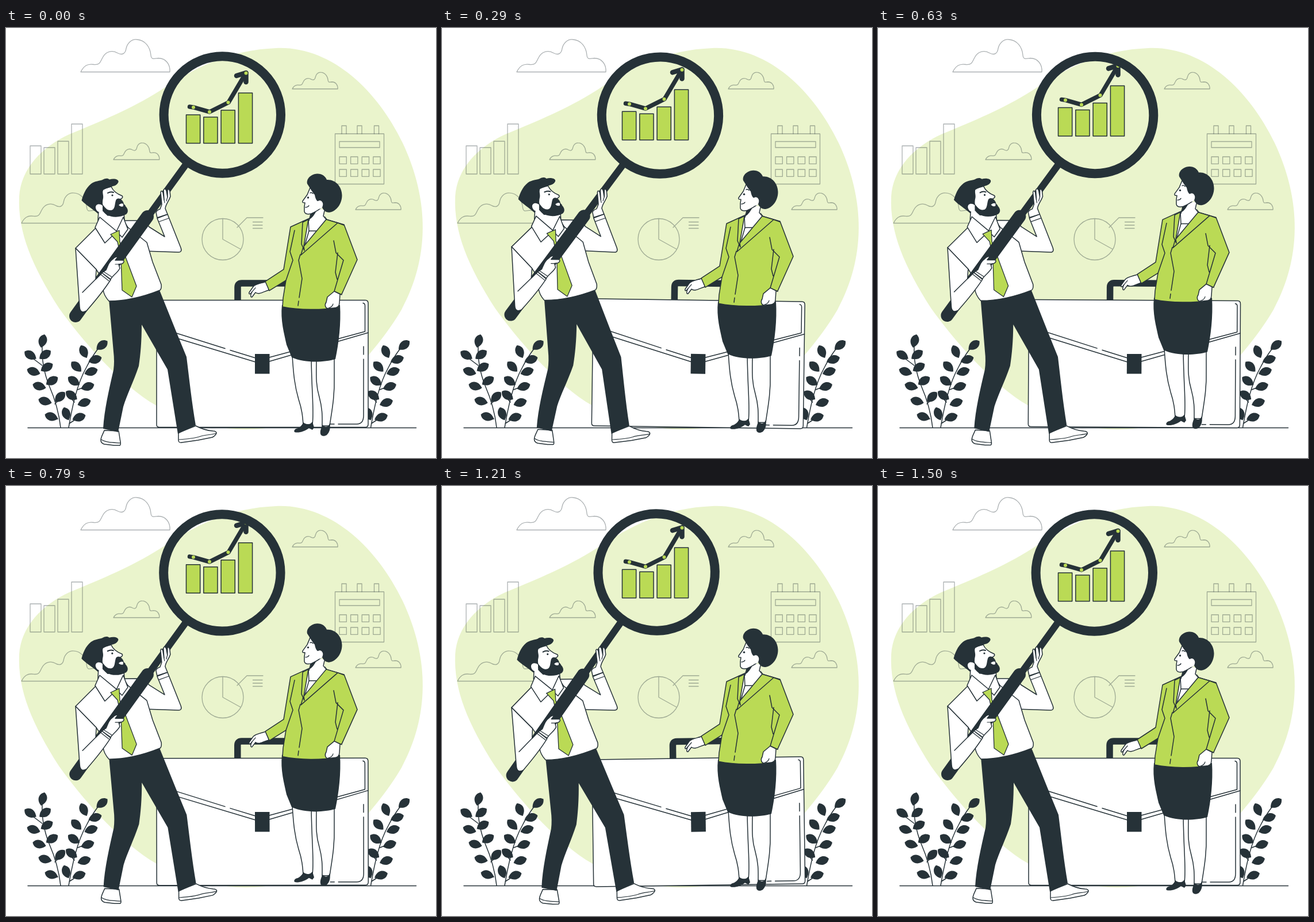
These frames come from a looping animation (748 by 748 pixels, 1.54 s). An HTML page with a canvas:

```html
<!DOCTYPE html>
<html lang="en">
<head>
<meta charset="utf-8">
<title>Business growth</title>
<style>
html, body { margin: 0; width: 100%; height: 100%; overflow: hidden; background: #fff; }
canvas { display: block; width: 748px; height: 748px; }
</style>
</head>
<body>
<canvas id="stage" width="748" height="748"></canvas>
<script>
const ctx = document.getElementById('stage').getContext('2d');
const DARK = '#263238', GREEN = '#bada55', PALE = '#eaf4cc', WHITE = '#fff';
const FAINT = 'rgba(38,50,56,.38)';
const LOOP = 1540, CYCLE = 1500, LIFT = 14.96;

ctx.lineJoin = ctx.lineCap = 'round';

function shape(d, fill, stroke = DARK, width = 1.5) {
  const path = new Path2D(d);
  if (fill) { ctx.fillStyle = fill; ctx.fill(path); }
  if (stroke) { ctx.strokeStyle = stroke; ctx.lineWidth = width; ctx.stroke(path); }
}
const solid = (d, color = DARK) => shape(d, color, null);
const line = (d, width = 1.5, color = DARK) => shape(d, null, color, width);
const box = (x, y, w, h) => `M${x} ${y}h${w}v${h}h${-w}z`;

function disc(x, y, r, color) {
  ctx.fillStyle = color;
  ctx.beginPath();
  ctx.arc(x, y, r, 0, Math.PI * 2);
  ctx.fill();
}

function placed(draw, dx, dy) {
  ctx.save();
  ctx.translate(dx, dy);
  draw();
  ctx.restore();
}

function turned(draw, cx, cy, degrees) {
  ctx.save();
  ctx.translate(cx, cy);
  ctx.rotate(degrees * Math.PI / 180);
  ctx.translate(-cx, -cy);
  draw();
  ctx.restore();
}

function cloud(x, y, scale) {
  ctx.save();
  ctx.translate(x, y);
  ctx.scale(scale, scale);
  line('M0 0C5-10 11-15 23-13C34-12 34-18 38-25C44-37 56-38 64-33C73-28 78-33 79-41' +
       'C81-50 88-57 97-56.5C112-56 121-43 122-29C123-21 127-23 135-24C149-24 156-12 155 0Z', 1.3 / scale, FAINT);
  ctx.restore();
}

function background() {
  solid('M470 35C565 31 645 107 690 200C737 300 737 400 688 490C655 546 610 594 560 645' +
        'C500 698 440 700 400 698C340 692 290 675 250 650C190 610 130 540 92 487' +
        'C46 415 20 355 23 293C26 245 62 207 110 185C170 160 215 142 268 109C330 68 390 38 470 35Z', PALE);

  cloud(130, 76.5, 1);
  cloud(498, 106, .51);
  cloud(187, 229, .515);
  cloud(608, 316, .51);
  cloud(27, 339.5, .93);

  [205, 208, 197, 167].forEach((top, i) => line(box(42 + 24 * i, top, 19, 254 - top), 1.3, FAINT));

  line(box(572.5, 184, 85, 87.5) + box(580, 197.5, 70, 10.5), 1.3, FAINT);
  for (const x of [584, 611, 640.5]) line(`M${x} 184v-14h8v14`, 1.3, FAINT);
  for (let i = 0; i < 8; i++) {
    line(box(580 + 19.6 * (i % 4), i < 4 ? 224 : 246, 12.3, 12.3), 1.3, FAINT);
  }

  line('M341 367.5a36 36 0 1 0 72 0a36 36 0 1 0-72 0M377 332v35.5l31.5 17.5M402 347l17-17h28' +
       'M429.5 337.5h16.5M429.5 343h16.5M429.5 348.5h16.5', 1.3, FAINT);
  line('M38 695.5H713.5');
}

// Each leaf is [x, y, angle], measured at its middle.
const tallPlant = [
  [64, 544.5, -75], [42.5, 569, 212], [68, 568.5, -35], [48, 597.5, 198], [71, 590.5, -30], [58, 623, 195],
  [80, 614, -32], [68, 649, 195], [94, 642, -45], [79, 676, 198]
];
const leaningPlant = [
  [167, 552, -38], [135.5, 563, 245], [155, 577, -18], [122.5, 589, 225], [148, 598, -18], [118, 614, 214],
  [142, 624, -18], [114, 639, 216], [136, 652, -18], [105, 671, 250], [127, 677.5, -18]
];

function plant(stem, leaves) {
  line(stem, 1.5);
  for (const [x, y, angle] of leaves) {
    placed(() => {
      ctx.rotate(angle * Math.PI / 180);
      solid('M-12 0C-8-5-4-7.500 1-7.500C7-7 10-4 12 0C9 5 5 7.500 0 7C-5 6.500-8 4-12 0Z');
    }, x, y);
  }
}
const leaning = () =>
  plant('M109 695C115 660 123 620 140 590C147 576 154 566 160 558M119 651l-5-6M125 629l13-5M110 688l14-9', leaningPlant);

function plants() {
  plant('M95 695C92 668 85 645 75 622C65 597 62 575 63 552M90 680l-10-3M85 654l8-8M63 587l-16-12', tallPlant);
  leaning();
  placed(leaning, 525.5, 0);
}

function briefcase() {
  line('M403 476V451Q403 444 410 444H485Q493 444 493 452V476', 11.5);
  shape('M267 473.5H625Q630 473.5 630 479V689Q630 694.5 625 694.5H267Q262 694.5 262 690V478.5Q262 473.5 267 473.5Z', WHITE);
  line('M262 520L381 557.5M390 560.5L434 574M262 529L434 581M458 573L624.5 528V483Q624.5 479 621 478.5' +
       'M458 580L630 530M622 554v14M622 576v98Q622 689 610 689H578M564 689h7');
  solid(box(433, 567, 25.5, 34.5));
}

function womanLegs() {
  shape('M498 570C500 602 502 622 509 646C515 664 516 676 517 690H533C536 665 532 640 531 575Z', WHITE);
  shape('M540 575C540 600 538 619 545 642C551 664 550 678 550 692H563C567 665 572 640 571 608V572Z', WHITE);
  solid('M517 686C524 691 529 690 533 685L536 695L533 699L527 696C519 702 509 705 502 703C500 700 503 697 508 696Q515 692 517 686Z');
  solid('M550 690C556 696 561 694 563 688C565 696 563 703 558 708C553 711 548 710 547 706C546 699 549 696 550 690Z');
  solid('M480 482C477 508 484 532 488 551L497 573C520 583 552 582 573 576C579 548 583 514 581 482Z');
}

function womanJacket() {
  shape('M455 440C446 444 434 445 430 450L423 460C422 464 425 464 428 459C425 464 425 469 428 468L434 460C440 465 449 458 457 456Z', WHITE);
  line('M428 459L434 452', 1.2);

  shape('M517 336L495 346L483 420L451 441L458 457L487 439L482 470L481 485C510 491 549 491 579 486L578 464' +
        'L584 463L611 403L588 342L557 333L519 387Z', GREEN);
  line('M502 352L494 389L499 404L487 439M570 370L574 391L587 404L571 458L584 464M577 391L573 425L576 437');
  shape('M571 458L581 463L580 478C580 486 574 487 570 487L561 488C555 488 554 481 557 477L559 468Z', WHITE);
  line('M561 487C566 486 568 484 569 480', 1.2);

  shape('M517 336L528 331L554 328L558 333L519 386Z', WHITE);
  line('M526 333L527 354M527 353H542M527 353L519 381');
  shape('M557 333L577 339L588 343M577 339L513 395L517 381L557 333Z', GREEN);
  shape('M526 333L516 338L514 376L519 387L518 380Z', GREEN);
  line('M512 394L509 404L515 436L510 469M509 475L508 483');
}

function womanHead() {
  shape('M533 314L528 335Q528 344 533 345L557 332Q552 329 554 316Z', WHITE, null);
  line('M530 324L527 335M554 318L552 327L557 333');
  solid('M526 322Q535 322 541 316Q535 329 528 333L530 325Z');
  shape('M529 278L524 290L516 301C515 304 517 304 520 304L519 311L519 319C520 325 527 324 531 323' +
        'C540 319 546 315 549 312L552 288L536 278Z', WHITE);
  solid('M524 271C522 262 531 254 541 253.5C549 253 556 258 558 264C573 263 584.5 276 584.5 291' +
        'C584.5 306 575 318 564 320.5C557 322 552 317 550 312L545 301C541 304 538 296 537 290C533 286 530 280 524 271Z');
  shape('M541 303C546 296 553 303 551 309C550 315 545 316 541 313Z', WHITE, null);
  line('M521 312Q525 312 527 309M529 287Q531 285 534 288', 1.4);
  disc(525.5, 295, 1.7, DARK);
}

function woman() {
  womanLegs();
  womanJacket();
  womanHead();
}

function chart() {
  [151, 155, 143, 113].forEach((top, i) => shape(box(313.5 + 30.3 * i, top, 24.2, 200.5 - top), GREEN));
  line('M319.5 137L326 138L354 146L387 129.5L417.5 78', 7.5);
  line('M401 83L417.5 78V94', 8.5);
  for (const [x, y] of [[326, 138], [354, 146], [386.5, 129.5], [417.5, 78.5]]) disc(x, y, 3, GREEN);
}

function manLegs() {
  shape('M171 700C169 706 165 711 165 717Q165 722 171 724L188 726H198Q200 725 199 720L196 701Z', WHITE);
  line('M166 716C173 721 186 721 199 722', 1.2);
  shape('M300 704L300 717Q300 722 306 721L334 717L359 712Q366 708 366 704Q365 701 360 701Q345 700 330 692Z', WHITE);
  line('M301 716C315 715 327 714 336 711C347 707 357 708 366 705', 1.2);
  solid('M179 472L267 456L296 528L314 572C319 612 323 650 330 691L299 706L281 594L236 516' +
        'C236 545 234 568 231 588C222 615 210 639 204 659L195 703L169 697C171 664 179 630 187 595Q189 580 187 563Z');
}

function manHead() {
  shape('M161 317L160 334L165 352L184 360L207 346L205 320Z', WHITE);
  shape('M168 280L183 276C187 285 194 289 202 292Q205 296 196 299L207 309L207 322L177 326L163 312Z', WHITE);
  solid('M131.500 300C134 291 138 279 148 271C155 266 163 266 168 264C173 261 177 261 180 263.500' +
        'C187 261 197 263 195.500 268C193 275 185 275 180 277Q172 280 169 282C167 286 170 291 169 296' +
        'Q167 304 169 310L160 323C151 315 139 308 131.500 300Z');
  solid('M168 307C172 312 176 318 183 317C190 316 189 306 191 300C193 295 199 296 202 300' +
        'C206 304 204 308 208 310C214 316 212 322 209 324C199 330 184 330 176 325C169 321 166 315 168 307Z');
  solid('M196 308Q200 304 204 306L204 310Q200 312 196 308Z', WHITE);
  shape('M168 309C162 304 155 307 156 313C157 319 163 322 168 321Z', WHITE, null);
  line('M177 287Q182 284 187 286', 2);
  disc(185, 291, 1.6, DARK);
}

function magnifier() {
  line('M314 236L245 331', 12);
  line('M246 328L121 501', 22);
  ctx.lineWidth = 16;
  ctx.strokeStyle = DARK;
  ctx.beginPath();
  ctx.arc(376.3, 151, 101.7, 0, Math.PI * 2);
  ctx.stroke();
}

function man() {
  manLegs();

  shape('M204 335H240L249 346L276 363L263 331L281 324L304 382Q307 390 300 390L240 388Z', WHITE);
  shape('M158 346L121 383L157 420L171 441L169 455Q170 465 179 475C208 475 238 468 268 456Q271 453 270 446L255 407L245 373L211 346L204 333Z', WHITE);
  manHead();
  shape('M163 329L155 347L172 374L193 354Z', WHITE);
  shape('M204 329L212 350L202 364L192 354Z', WHITE);
  shape('M182 359L197 352L198 372L227 449L219 468L202 456L200 400L194 372Z', GREEN, DARK, 1.3);

  magnifier();

  // Near arm: sleeve below the grip, then the hand around it.
  shape('M121 383L128 485Q129 498 140 492C154 476 168 460 182 438L167 426L156 437L157 420Z', WHITE);
  line('M133 460L167 426');
  solid('M157 437L175 411L186 402L178 413L174 421L167 426Z');
  shape('M167 426L174 421C178 412 179 407 186 402C189 398 194 397 194 399L190 404L204 404Q207 407 202 410L196 411L198 418C194 426 187 429 182 437Z', WHITE);
  line('M165 429L179 440M170 424L184 433M196 411L190 411', 1.2);

  shape('M263 330L261 321Q262 317 268 315L271 307L269 286Q270 281 273 286L275 299L274 282Q276 277 279 283L281 294' +
        'L281 282Q283 278 285 284L286 293C283 302 278 306 277 314L281 324Z', WHITE);
  line('M275 299L276 304M281 294L279 301M266 337L283 331', 1.2);
}

function draw(now) {
  const phase = Math.min(now % LOOP, CYCLE) / CYCLE;
  const lift = -LIFT * (1 - Math.abs(2 * phase - 1));
  // Triangle wave: +1 at a quarter, -1 at three quarters.
  const sway = phase < .25 ? 4 * phase : phase < .75 ? 2 - 4 * phase : 4 * phase - 4;

  ctx.fillStyle = WHITE;
  ctx.fillRect(0, 0, 748, 748);
  background();
  plants();
  turned(briefcase, 446, 567, sway);
  placed(woman, 0, lift);
  placed(chart, 0, lift);
  turned(man, 298, 384, sway);
}

function tick() {
  draw(performance.now());
  requestAnimationFrame(tick);
}
tick();
</script>
</body>
</html>
```
